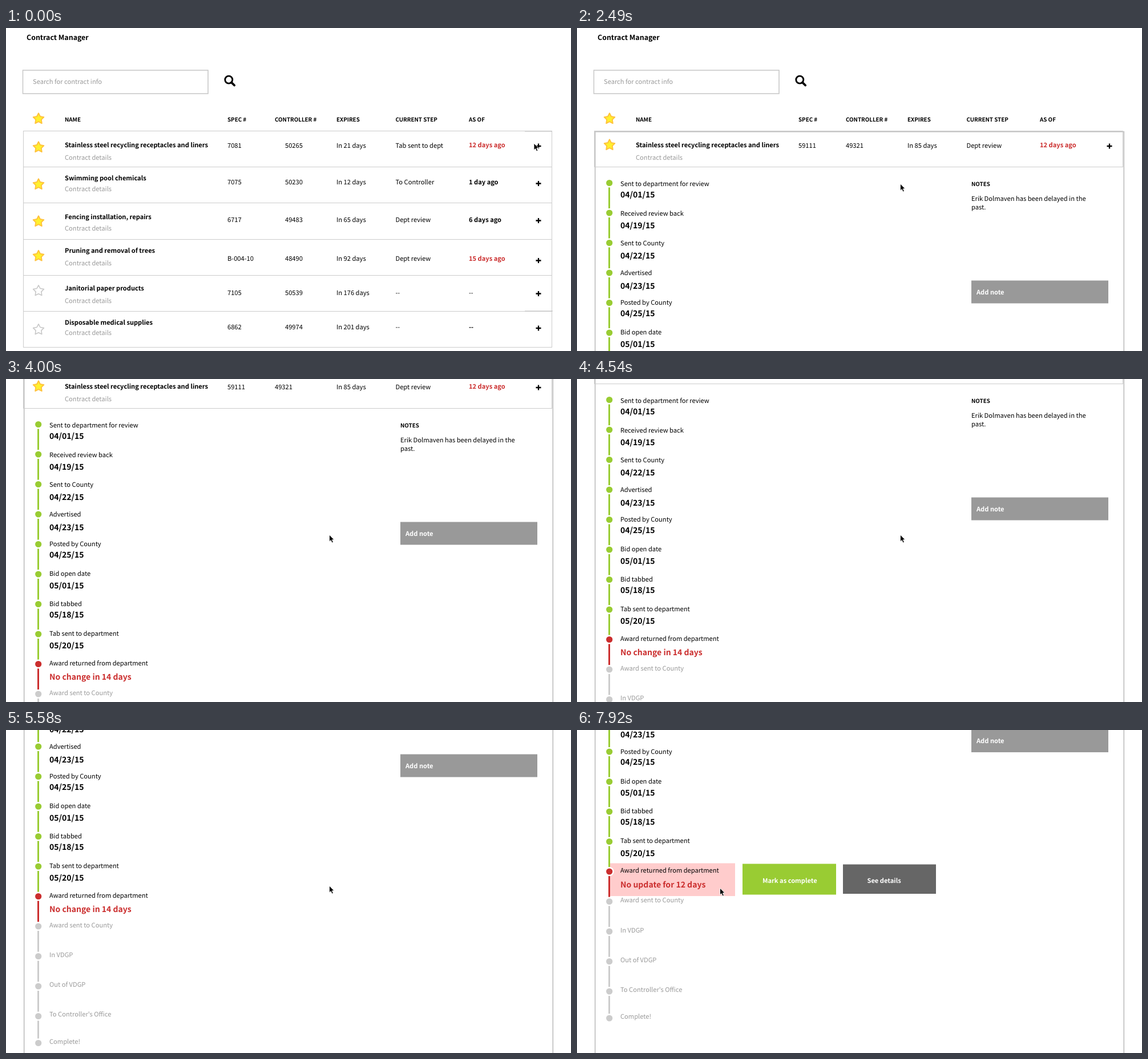
Write an HTML page that moves like this. It is 990 by 566 pixels and loops after 8000 ms.

```html
<!DOCTYPE html>
<html lang="en">
<head>
<meta charset="utf-8">
<title>Contract Manager</title>
<style>
html, body { margin: 0; width: 100%; height: 100%; overflow: hidden; background: #fff; }
svg { display: block; }
text {
  font: 400 11.15px "Noto Sans CJK JP", "Noto Sans CJK SC", "Noto Sans CJK KR", "Noto Sans", sans-serif;
  text-rendering: geometricPrecision;
  white-space: pre;
}
.b { font-weight: 700; font-size: 11.1px; }
.h { font-weight: 700; font-size: 9.8px; }
.t { font-weight: 700; font-size: 12.4px; }
.d { font-weight: 700; font-size: 14px; }
</style>
</head>
<body>
<svg id="stage" width="990" height="566" viewBox="0 0 990 566"></svg>
<script>
const NS = 'http://www.w3.org/2000/svg';
const GREEN = '#99cc33', RED = '#cb2e2e', PALE = '#cccccc', GREY = '#999999';
const stage = document.getElementById('stage');

function add(parent, tag, attrs) {
  const el = document.createElementNS(NS, tag);
  for (const k in attrs) el.setAttribute(k, attrs[k]);
  parent.appendChild(el);
  return el;
}
const group = parent => add(parent, 'g', {});

// y is the middle of the capitals
function text(parent, str, x, y, cls = '', fill = '#000') {
  const drop = { h: 3.6, t: 4.5, d: 5 }[cls] || 4.1;
  const el = add(parent, 'text', { x, y: y + drop, class: cls, fill });
  el.textContent = str;
  return el;
}
function box(parent, x1, y1, x2, y2, attrs) {
  return add(parent, 'rect', { x: x1, y: y1, width: x2 - x1, height: y2 - y1, ...attrs });
}
function path(parent, d, stroke, width, more = {}) {
  return add(parent, 'path', { d, stroke, 'stroke-width': width, fill: 'none', ...more });
}
function star(parent, x, y, on) {
  let d = '';
  for (let i = 0; i < 10; i++) {
    const r = i % 2 ? 5.1 : 9.8, a = i * Math.PI / 5;
    d += (i ? 'L' : 'M') + (x + r * Math.sin(a)).toFixed(2) + ' ' + (y + 0.6 - r * Math.cos(a)).toFixed(2);
  }
  path(parent, d + 'Z', on ? '#ffc23d' : '#c8c8c8', on ? 1.9 : 1.6,
    { fill: on ? '#fff02e' : '#fff', 'stroke-linejoin': 'round' });
}
const plus = (parent, y) => path(parent, `M928.5 ${y}h9M933 ${y - 4.5}v9`, '#000', 2.3);

const page = group(stage);

// Top of the page
text(page, 'Contract Manager', 36, 16, 't');
box(page, 29.5, 74, 354, 115, { fill: '#fff', stroke: '#c6c6c6', 'stroke-width': 1.5 });
text(page, 'Search for contract info', 47, 93.5, '', GREY);
add(page, 'circle', { cx: 390.3, cy: 90.6, r: 6.5, fill: 'none', stroke: '#000', 'stroke-width': 2.9 });
path(page, 'M395 95.3L400.2 100.5', '#000', 3.8, { 'stroke-linecap': 'round' });
star(page, 57, 158.5, true);

const cols = [103, 388, 471, 579, 682.5, 811];
['NAME', 'SPEC #', 'CONTROLLER #', 'EXPIRES', 'CURRENT STEP', 'AS OF']
  .forEach((s, i) => text(page, s, cols[i], 160.5, 'h'));

// offsets are relative to the middle line y of the cells
function row(parent, y, name, cells, look, nameUp, subDown, starDown, plusDown, indent = 18) {
  star(parent, 57, y + starDown, !look.off);
  text(parent, name, cols[0], y - nameUp, 'b');
  text(parent, 'Contract details', cols[0], y + subDown, '', GREY);
  cells.split('|').forEach((s, i) => {
    const age = i === 4;
    text(parent, s, cols[i + 1] + (i === 1 ? indent : 0), y - (age && look.up || 0),
      age && !look.plain ? 'b' : '', age && look.late ? RED : '#000');
  });
  plus(parent, y + plusDown);
}

// Closed list
const list = group(page);
box(list, 30.5, 180.5, 956.5, 559.5, { fill: 'none', stroke: PALE });
for (let i = 1; i < 6; i++) path(list, `M30.5 ${Math.round(180 + i * 63.2) + 0.5}H956.5`, PALE, 1);
path(list, 'M909 181H957M909 496H958', '#bdbdbd', 1);
const first = 'Stainless steel recycling receptacles and liners';
const late = { late: true };
const top1 = { late: true, up: 1 };
row(list, 205.5, first, '7081|50265|In 21 days|Tab sent to dept|12 days ago', top1, 1, 21, 3, 1.5);
row(list, 269.5, 'Swimming pool chemicals', '7075|50230|In 12 days|To Controller|1 day ago', {}, 7, 12, 4, 3);
row(list, 335.5, 'Fencing installation, repairs', '6717|49483|In 65 days|Dept review|6 days ago', {}, 5, 15.5, 3, 2);
row(list, 404, 'Pruning and removal of trees', 'B-004-10|48490|In 92 days|Dept review|15 days ago', late, 14.5, 7.5, -5, 3.5);
row(list, 463.5, 'Janitorial paper products', '7105|50539|In 176 days|--|--', { off: true, plain: true }, 8, 14.5, -3.5, 2);
row(list, 524, 'Disposable medical supplies', '6862|49974|In 201 days|--|--', { off: true }, 8, 9.5, 4, 2);

// Opened contract
const detail = group(page);
box(detail, 31.7, 181.7, 958.3, 1200, { fill: '#fff', stroke: '#c4c4c4', 'stroke-width': 1.8 });
box(detail, 30.5, 180.5, 956.5, 243.5, { fill: 'none', stroke: PALE });
row(detail, 205.5, first, '59111|49321|In 85 days|Dept review|12 days ago', top1, 1, 21, -1, 1.5, 0);

text(detail, 'NOTES', 691, 273.5, 'h');
text(detail, 'Erik Dolmaven has been delayed in the', 691, 298.5);
text(detail, 'past.', 691, 313.5);
box(detail, 691, 442.5, 931, 482.5, { fill: GREY });
text(detail, 'Add note', 700, 462.8, 'b', '#fff');

const hover = group(detail);
box(hover, 57, 677, 277, 734.5, { fill: '#ffcccc' });
box(hover, 290, 678, 454, 732, { fill: GREEN });
text(hover, 'Mark as complete', 325, 707, 'b', '#fff');
box(hover, 466, 679, 629, 730.5, { fill: '#666' });
text(hover, 'See details', 508.5, 707, 'b', '#fff');

// Timeline
const labels = ['Sent to department for review', 'Received review back', 'Sent to County', 'Advertised',
  'Posted by County', 'Bid open date', 'Bid tabbed', 'Tab sent to department',
  'Award returned from department', 'Award sent to County', 'In VDGP', 'Out of VDGP',
  "To Controller's Office", 'Complete!'];
const dates = ['04/01', '04/19', '04/22', '04/23', '04/25', '05/01', '05/18', '05/20'];
const gaps = [19, 21.8, 22.3, 23, 18.6, 20.7, 19.2, 21.6];
const last = labels.length - 1;
const dotY = i => 271.5 + 52.5 * i - (i === last ? 5.5 : 0);
const labelY = i => 272.5 + 52.15 * i - (i === last ? 4.8 : 0);
const tone = i => i < 8 ? GREEN : i === 8 ? RED : PALE;
for (let i = 0; i < last; i++) path(detail, `M56.5 ${dotY(i)}V${dotY(i + 1)}`, tone(i), 3);
labels.forEach((label, i) => {
  add(detail, 'circle', { cx: 56.7, cy: dotY(i), r: 8, fill: '#fff' });
  add(detail, 'circle', { cx: 56.7, cy: dotY(i), r: 5.6, fill: tone(i) });
  text(detail, label, 76, labelY(i), '', i < 9 ? '#000' : GREY);
  if (dates[i]) text(detail, dates[i] + '/15', 76, labelY(i) + gaps[i], 'd');
});
const status = text(detail, '', 76, 714.3, 'd', RED);

const cursor = path(stage, 'M0 0V12L2.7 9.5L4.7 14L6.9 13.1L5 8.7H8.6Z', '#fff', 0.9,
  { fill: '#000', 'stroke-linejoin': 'round' });

const LOOP = 8000, OPEN = 1420, HOVER = 7620;
// time, scroll
const scrolls = [
  [0, 0], [2930, 85], [3140, 130], [3800, 162], [4000, 192], [4180, 200], [4540, 235],
  [4720, 276], [4930, 288], [5400, 345], [5580, 400], [5790, 436], [5950, 443.5]
];
// time, x, y
const moves = [
  [0, 925, 202], [140, 925, 206], [680, 933, 206], [1750, 930, 210],
  [2050, 820, 235], [2200, 670, 262], [2340, 585, 271], [2490, 566.5, 273],
  [5950, 540, 275], [6110, 420, 280], [6280, 260, 284], [6440, 178.5, 285],
  [6580, 152.5, 282.5], [6880, 155, 279], [7020, 157, 276.5],
  [7620, 185, 277], [7770, 235, 277], [7920, 250.5, 277]
];
const at = (table, t) => table.filter(step => step[0] <= t).pop();
const show = (el, on) => { el.style.display = on ? '' : 'none'; };

function draw(now) {
  const t = now % LOOP;
  const [, x, y] = at(moves, t);
  page.setAttribute('transform', `translate(0 ${-at(scrolls, t)[1]})`);
  cursor.setAttribute('transform', `translate(${x} ${y})`);
  show(list, t < OPEN);
  show(detail, t >= OPEN);
  show(hover, t >= HOVER);
  status.textContent = t >= HOVER ? 'No update for 12 days' : 'No change in 14 days';
}
const start = performance.now();
function tick() {
  draw(performance.now() - start);
  requestAnimationFrame(tick);
}
tick();
</script>
</body>
</html>
```
